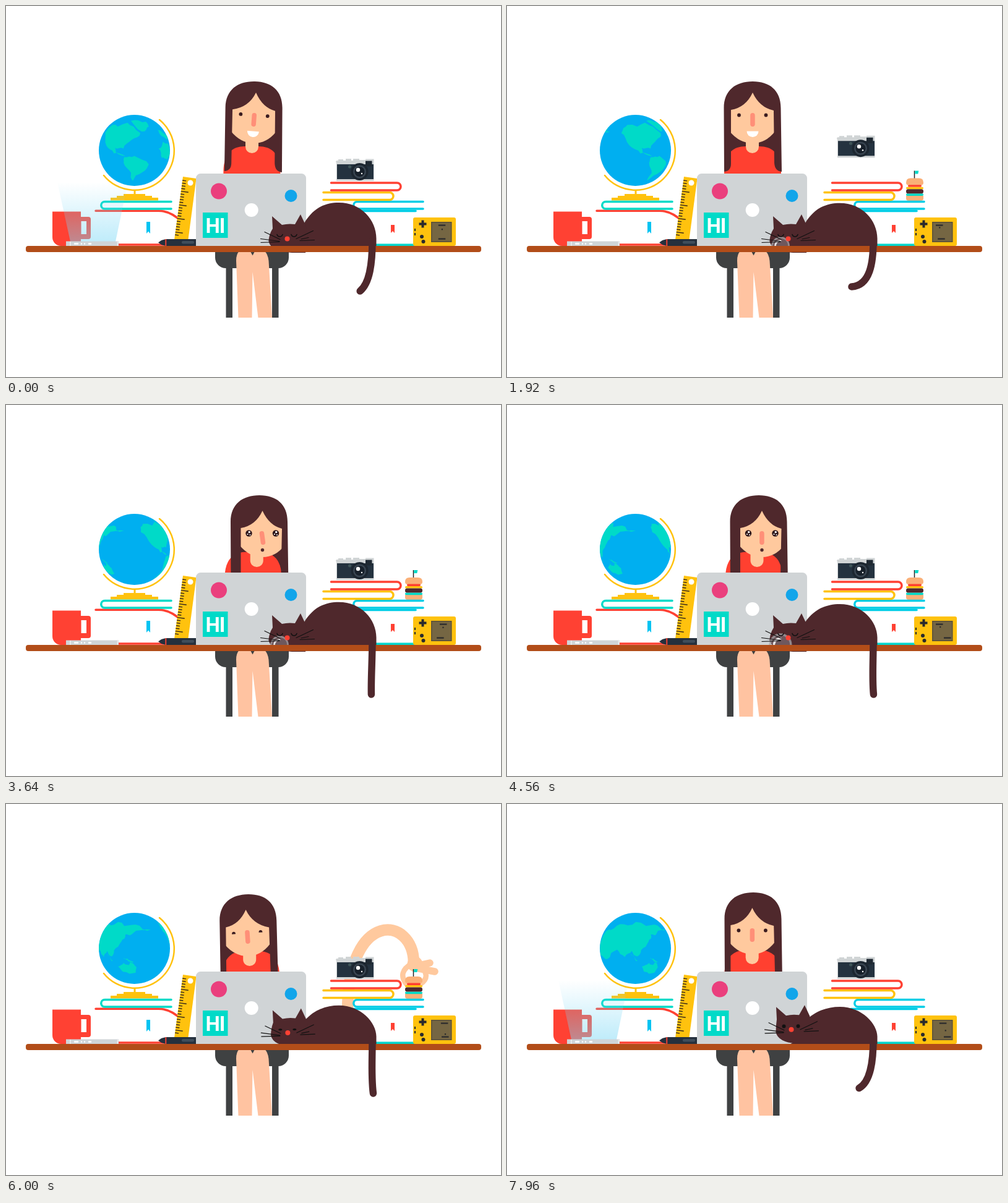
Recreate the animation shown at these times as an HTML page. Size 800 by 600 pixels, loop 8 s.

```html
<!DOCTYPE html>
<html lang="en">
<head>
<meta charset="utf-8">
<title>Desk</title>
<style>
html, body { margin: 0; width: 100%; height: 100%; overflow: hidden; background: #fff; }
svg { display: block; width: 100vw; height: 100vh; }
.line { fill: #fff; stroke-width: 3.5; stroke-linecap: round; }
.skin { fill: #ffc99e; }
.limb { fill: none; stroke: #ffc99e; stroke-linecap: round; }
.hair { fill: #4f282c; }
.ink { fill: none; stroke: #111; stroke-width: 1.2; stroke-linecap: round; }
</style>
</head>
<body>
<svg viewBox="0 0 800 600">
  <defs>
    <clipPath id="ball"><circle cx="207.5" cy="233.5" r="57.5"/></clipPath>
    <linearGradient id="glow" x1="0" y1="0" x2="0" y2="1">
      <stop offset="0" stop-color="#7ad7f5" stop-opacity="0"/>
      <stop offset="1" stop-color="#7ad7f5" stop-opacity=".48"/>
    </linearGradient>
    <g id="sparkle">
      <circle r="5.2" fill="#2d1619"/>
      <g fill="#fff"><circle cx=".7" cy="-2" r="1.7"/><circle cx="-2" cy="1.500" r="1.100"/><circle cx="2" cy="2.500" r="1"/></g>
    </g>
  </defs>

  <!-- chair and legs -->
  <g fill="#3f4142">
    <rect x="355.500" y="415" width="10.500" height="89"/>
    <rect x="430" y="415" width="10.500" height="89"/>
    <rect x="338" y="382" width="119" height="42" rx="17"/>
  </g>
  <path fill="#ffc3a1" d="M378 396Q372 400 372 412L375.500 504H397.500L398.500 430L407.500 504H430L424.500 412Q423 400 417 396Z"/>
  <path fill="#3f4142" d="M395 397h7l-3.500 6.500z"/>

  <!-- globe -->
  <circle cx="207.500" cy="233.500" r="57.500" fill="#00aff0"/>
  <path id="land" clip-path="url(#ball)" fill="#00dac8"/>
  <path d="M248 184A64 64 0 1 1 158 274" fill="none" stroke="#ffc20e" stroke-width="2.500" stroke-linecap="round"/>
  <path fill="#ffc20e" d="M206.500 297h3v7h15.500v3h11v3h10v4.500h-77v-4.500h10v-3h11v-3h16.500z"/>

  <!-- left books -->
  <path class="line" stroke="#ff4133" d="M182 386H262M145 331.200H246Q266 331 284 349"/>
  <path class="line" stroke="#00dac8" d="M267 316.500H159.500a5.700 5.700 0 0 0 0 11.500H267"/>
  <path fill="#00c3f2" d="M227 349h6v19l-3-3.500l-3 3.500z"/>

  <!-- mug, phone and its beam -->
  <path fill="#ff4133" fill-rule="evenodd" d="M75 332.500H121V341H133a4 4 0 0 1 4 4V373a4 4 0 0 1-4 4H121V388H89a14 14 0 0 1-14-14zM121.500 348V369H130V348z"/>
  <path id="beam" fill="url(#glow)" d="M83 285H197L177 381H104Z"/>
  <rect x="97" y="380.500" width="85" height="7.500" fill="#cfd4d7"/>
  <path d="M104 381v7M180.500 381v7" stroke="#eef1f2" stroke-width="1.500"/>
  <path d="M111 384.500h5M122 384.500h0M127 384.500h0M134 384.500h3" stroke="#fff" stroke-width="2.500" stroke-linecap="round"/>

  <!-- ruler -->
  <path fill="#ffc20e" d="M286 276L307.500 279L294 381L272 378Z"/>
  <circle cx="298" cy="286" r="4.500" fill="#fff"/>
  <path id="ticks" stroke="#33261a" stroke-width="1.400"/>

  <!-- pen -->
  <path fill="#25303d" d="M246 382.500L251 379L258 377H310q3 0 3 2.500h2.500q2 0 2 3t-2 3H313q0 2.500-3 2.500H258L251 386z"/>
  <path d="M258.300 377V388" stroke="#ff4133" stroke-width="1.800"/>
  <rect x="284" y="380" width="20" height="4.500" rx="2" fill="#3f4d5b"/>

  <!-- girl -->
  <path id="mane" class="hair" d="M352 165H442V255H352Z"/>
  <path id="shirt" fill="#ff4030" d="M351 300V268C351 243 362 227 385 227H408C432 227 443 243 443 268V300Z"/>
  <path id="neck" class="skin" d="M386 200H407V227.500a10.500 10.500 0 0 1-21 0z"/>
  <g id="head">
    <path id="face" class="skin" d="M397 136L433 166V203Q418 222 397 222Q376 222 360 203V166Z"/>
    <path id="hair" class="hair"/>
    <g id="features">
      <rect id="nose" x="393.200" y="173" width="7.500" height="22" rx="3.700" fill="#ff8f78"/>
      <path id="smile" fill="#fff" d="M387.500 202.500h19a9.500 9.500 0 0 1-19 0z"/>
      <circle id="oh" cx="397" cy="203.500" r="2.700" class="hair"/>
      <g id="dots" fill="#3b1c20"><circle cx="375" cy="176.500" r="2.900"/><circle cx="418.500" cy="176.500" r="2.900"/></g>
      <path id="lids" fill="#3b1c20" d="M372 178a3 3.600 0 0 1 6 0zM415.500 178a3 3.600 0 0 1 6 0z"/>
      <g id="wide"><use href="#sparkle" x="375" y="176.500"/><use href="#sparkle" x="418.500" y="176.500"/></g>
    </g>
  </g>

  <!-- laptop -->
  <path fill="#d0d4d6" d="M307 388V278.500a7.500 7.500 0 0 1 7.500-7.500H477.500a7.500 7.500 0 0 1 7.500 7.500V388Z"/>
  <circle cx="344" cy="299.500" r="13" fill="#ea3f7d"/>
  <circle cx="460.500" cy="307" r="10" fill="#12a5ea"/>
  <circle cx="396.700" cy="330" r="11" fill="#fff"/>
  <rect x="318" y="334" width="40.500" height="41" fill="#00dac8"/>
  <text x="338" y="366.500" font-family="Roboto, sans-serif" font-weight="700" font-size="33" letter-spacing="-1" text-anchor="middle" fill="#fff">HI</text>

  <!-- arm and burger -->
  <path id="arm" class="limb" stroke-width="18.500"/>
  <g id="hand" class="limb">
    <circle cx="2" cy="-41" r="6" stroke-width="13"/>
    <path stroke-width="11.500" d="M8 -39L26 -43M8 -34L34 -29"/>
    <path stroke-width="8.500" d="M-3 -42Q-27 -28 -12 -9M8 -40Q30 -22 11 -9"/>
  </g>
  <g id="burger">
    <path d="M-.500 -33V-18" stroke="#222" stroke-width="1.500"/>
    <path fill="#00dac8" d="M.300 -33h6l-1 5h-5z"/>
    <g fill="#fab078">
      <path d="M-14 -14q0-7 7-7h14q7 0 7 7q0 4-4 4h-20q-4 0-4-4z"/>
      <path d="M-14 7h28v4q0 4-4 4h-20q-4 0-4-4z"/>
    </g>
    <rect x="-11" y="-10.500" width="22" height="3.500" rx="1.700" fill="#ff4030"/>
    <rect x="-14" y="-7" width="28" height="3.500" rx="1.700" fill="#ffc20e"/>
    <rect x="-14" y="3.500" width="28" height="3.700" rx="1.800" fill="#00dac8"/>
    <rect x="-14" y="-3.500" width="28" height="7" rx="3.300" class="hair"/>
  </g>

  <!-- right books -->
  <rect x="555" y="331" width="107" height="57" fill="#fff"/>
  <path class="line" stroke="#00cde6" d="M556 331.500H662"/>
  <path class="line" stroke="#00d5cc" d="M598 386.300H662"/>
  <path class="line" stroke="#00cde6" d="M674 316.500H567.500a5.700 5.700 0 0 0 0 11.500H674"/>
  <path class="line" stroke="#ffc20e" d="M513 301.500H620a6 6 0 0 1 0 12H513"/>
  <path class="line" stroke="#ff4133" d="M525.500 286H632a6 6 0 0 1 0 12H525.500"/>
  <path fill="#ff4133" d="M622 354h6v13l-3-3l-3 3z"/>

  <!-- camera -->
  <g id="camera">
    <path fill="#d0d4d5" d="M533 252q0-2 2-2h2v-2h8v2h4v-3h9v3h3v-3h10v2h10v-1.500h13.500V283H534V254z"/>
    <path fill="#24323f" d="M535 256H594V280H535z"/>
    <path fill="#1f2932" d="M581 250.500h10.500v9h-10.500z"/>
    <circle cx="555.500" cy="260" r="2.500" fill="#3f5558"/>
    <circle cx="571.500" cy="268" r="14" fill="#1c2630"/>
    <circle cx="571.500" cy="268" r="10.500" fill="#3a4652"/>
    <circle cx="571.500" cy="268" r="8" fill="#17202a"/>
    <circle cx="569" cy="265" r="3.200" fill="#fff"/>
    <circle cx="575" cy="271" r="1.200" fill="#fff"/>
  </g>

  <!-- game console -->
  <rect x="658" y="342" width="69" height="46" rx="3" fill="#ffc20e"/>
  <rect x="687" y="349" width="33.500" height="33" fill="#5a5038"/>
  <rect x="688.500" y="350.500" width="30.500" height="30" fill="#756643"/>
  <g fill="#2a2a2c">
    <path d="M671.500 346.500h4v4h4v4h-4v4h-4v-4h-4v-4h4zM660 360h2v4h-2zM660 367h2v4h-2z"/>
    <circle cx="672" cy="373" r="3"/><circle cx="674.500" cy="381" r="3"/>
    <rect id="padA" y="353.500" width="11.500" height="2.200"/>
    <rect id="padB" y="375.500" width="11.500" height="2.200"/>
    <rect id="dot" width="2.200" height="2.200"/>
  </g>

  <!-- cat -->
  <path id="back" class="hair"/>
  <g id="cat">
    <path id="skull" class="hair"/>
    <g id="bubble" fill="none" stroke-width=".2">
      <path d="M-1 0A1 1 0 0 1 1 0" fill="#cfe6ee" fill-opacity=".25" stroke="#a9a6aa" stroke-opacity=".7"/>
      <path d="M-.620 -.050A.620 .620 0 0 1 0 -.620" stroke="#fff" stroke-opacity=".85" stroke-linecap="round"/>
    </g>
    <path class="ink" d="M418 365.500L443 377.500M411.500 376.500L442 380.500M412 382.500L442 381.500M469 376.500L496.500 363.500M477 377L489 374.500M475 379.500L498.500 378.500"/>
    <circle cx="454.500" cy="376.500" r="4" fill="#ff4133"/>
    <path id="shut" class="ink" style="stroke-width:1.500" d="M438 369.500q1 3.500 4.500 3.500t4.500-3.500M461 369.500q1 3.500 4.500 3.500t4.500-3.500"/>
    <g id="eyes" fill="#111"><ellipse cx="442.500" cy="371.300" rx="3"/><ellipse cx="465.500" cy="371" rx="3"/></g>
  </g>

  <rect x="32" y="388" width="736" height="10" rx="4" fill="#b24d19"/>
  <path id="tail" fill="none" stroke="#4f282c" stroke-width="11.500" stroke-linecap="round"/>
</svg>
<script>
const LOOP = 8000, TAU = 2 * Math.PI, RAD = TAU / 360, SPIN = 22.5;
const el = {};
document.querySelectorAll('[id]').forEach(n => el[n.id] = n);
const set = (id, name, value) => el[id].setAttribute(name, value);
const show = (id, on) => set(id, 'display', on ? 'inline' : 'none');
const clamp = (v, a, b) => Math.max(a, Math.min(b, v));
const mix = (a, b, u) => a + (b - a) * u;
const wave = (t, period, peak = 0) => Math.cos((t - peak) / period * TAU);
function ramp(t, a, b) {
  const u = clamp((t - a) / (b - a), 0, 1);
  return u * u * (3 - 2 * u);
}
let seed = 7;
const random = () => (seed = seed * 16807 % 2147483647) / 2147483647;

// Rough corners of each land as [longitude, latitude]; the coast between them is jagged.
const west = [
  [[-70, 29], [-62, 46], [-18, 51], [11, 29], [-5, 17], [-18, 3], [-33, 4], [-31, -3], [-15, -9], [-35, -5], [-53, 8]],
  [[-10, 56], [33, 54], [33, 42], [14, 32]],
  [[-17, -11], [0, -9], [26, -23], [18, -37], [-5, -59], [-7, -39], [-19, -20]],
  [[43, 3], [56, 14], [75, 10], [85, -5], [71, -15], [52, -12]],
  [[53, 36], [66, 30], [90, 20], [56, 24]]
];
const east = [
  [[-61, 32], [-36, 43], [1, 48], [46, 42], [77, 32], [39, 23], [28, 23], [22, 11], [9, -3], [3, -13], [-6, -4], [-18, -14], [-31, -2], [-54, -17], [-82, -12], [-85, 8]],
  [[-8, -9], [-3, -12], [5, -21], [1, -21]],
  [[25, -16], [32, -17], [43, -23], [33, -21]],
  [[12, -31], [25, -24], [34, -28], [36, -23], [48, -32], [47, -43], [19, -41]]
];
function jag(pts, depth = 2) {
  if (!depth) return pts;
  return jag(pts.flatMap((p, i) => {
    const q = pts[(i + 1) % pts.length], k = (random() - .5) * .35;
    const dx = q[0] - p[0], dy = q[1] - p[1];
    return [p, [p[0] + dx / 2 + dy * k, p[1] + dy / 2 - dx * k]];
  }), depth - 1);
}
const farSide = east.map(land => land.map(([lon, lat]) => [lon - 179, lat]));
const lands = [...west, ...farSide].map(land => jag(land));

function drawLand(t) {
  const spin = SPIN * t / 1000;
  let d = '';
  for (const pts of lands) {
    const mean = pts.reduce((sum, p) => sum + p[0], 0) / pts.length + spin;
    const turn = spin - Math.round(mean / 360) * 360;
    d += 'M' + pts.map(([lon, lat]) => {
      const a = clamp(lon + turn, -90, 90) * RAD, b = lat * RAD;
      return `${207.5 + 57.5 * Math.cos(b) * Math.sin(a)} ${233.5 - 57.5 * Math.sin(b)}`;
    }).join('L') + 'Z';
  }
  set('land', 'd', d);
}

function drawTicks() {
  let d = '';
  for (let i = 0; i < 21; i++) {
    const y = 282 + i * 4.4, w = i % 5 === 4 ? 12 : 6;
    d += `M${286 - (y - 276) * .137} ${y}l${w} ${w * .14}`;
  }
  set('ticks', 'd', d);
}

function drawGirl(t) {
  const greet = 1 - ramp(t, 0, 700), down = ramp(t, 1960, 2440), settle = ramp(t, 3640, 4560);
  const away = ramp(t, 5200, 5900), turn = ramp(t, 6200, 6900), rest = ramp(t, 7100, 7900);
  const x = 2 * greet + 12.5 * down - 2.5 * settle - 14 * away + 9 * turn - 4 * rest;
  const y = 24 * down - 3 * turn;
  const lean = 1.2 * greet - .7 * away + .7 * turn;
  const tilt = 3 * (greet - away + 2 * turn - rest);
  const fx = 5 * down - 6.6 * away, fy = 7 * down;
  const pose = `translate(${x} ${y}) rotate(${lean} 397 265)`;

  set('mane', 'transform', pose);
  set('head', 'transform', pose);
  set('shirt', 'transform', `translate(${x * .2} ${y * .45})`);
  set('neck', 'transform', `translate(${(x + fx) * .5} ${y})`);
  set('face', 'transform', `translate(${fx} 0)`);
  set('features', 'transform', `translate(${fx} ${fy}) rotate(${tilt} 397 185)`);
  set('nose', 'transform', `rotate(${8 * (settle - down)} 397 184)`);

  const l = 362 + fx, r = 431 + fx * .5, m = 397 + fx + tilt * .8;
  set('hair', 'd', `M351 268L350.5 165C350.5 136 370 122 397 122S442.5 136 442.5 165L444 268Q432 267 432 252
    L${r} ${169 + fy}Q${m + 11} ${164 + fy} ${m} ${140 + fy}Q${m - 11} ${164 + fy} ${l} ${168 + fy}V255Q${l} 267 351 268Z`);

  const awed = t > 2200 && t < 5400, sleepy = t >= 5400 && t < 7300;
  show('smile', t < 2200);
  show('oh', awed);
  show('wide', awed);
  show('lids', sleepy);
  show('dots', !awed && !sleepy);
}

// The hand rises behind the camera, reaches over for the burger and sinks with it.
function drawArm(t) {
  const rise = ramp(t, 5100, 5500) - ramp(t, 6980, 7350);
  const reach = ramp(t, 5500, 5900) - ramp(t, 6150, 6700);
  const x = 592 + 67 * reach, y = 207 + 93 * reach + 145 * (1 - rise), angle = -138 * (1 - reach);
  const s = Math.sin(angle * RAD), c = Math.cos(angle * RAD);
  const wx = x + 42 * s, wy = y - 42 * c, k = 28 + 50 * reach;
  const hold = `translate(${x} ${y}) rotate(${angle})`;
  show('arm', rise > 0);
  show('hand', rise > 0);
  set('arm', 'd', `M552 335C552 ${300 - 130 * reach} ${wx + k * s} ${wy - k * c} ${wx} ${wy}`);
  set('hand', 'transform', hold);

  const q = Math.max(0, t - 1600) / 1000;
  const pop = 1 - Math.exp(-9 * q) * Math.cos(14 * q);
  show('burger', t > 1600 && t < 7350);
  set('burger', 'transform', t > 6000 ? hold
    : `translate(659 315) scale(${Math.min(1, pop)} ${pop}) translate(0 -15)`);

  const hop = (t - 1600) / 447;
  set('camera', 'transform', `translate(0 ${-78 * Math.max(0, 1 - hop * hop)})`);
}

function drawCat(t) {
  const wake = .55 * ramp(t, 5400, 5900) + .45 * ramp(t, 6200, 6680);
  const breath = wave(t, 1720);
  const p = 320.5 - 2.5 * breath * (1 - wake) + 7.5 * wake;
  set('back', 'd', `M456 389Q470 384 472 366L482 351C497 ${p + 8} 516 ${p} 538 ${p}C574 ${p} 598.5 ${p + 28} 598.5 376V389Z`);

  const cheek = 424.5 + 5 * wake;
  set('cat', 'transform', `translate(${5 * wake ** 3} ${-11.7 * wake})`);
  set('skull', 'd', `M430 340L446 354Q456 351.5 467 353L476 337L484 354Q492 376 484 399H462Q${cheek + 4} 397 ${cheek} 381Q${cheek} 370 431 360Z`);
  show('shut', wake < .1);
  show('eyes', wake >= .1);
  for (const eye of el.eyes.children) eye.setAttribute('ry', 3 * wake);

  const size = (15.5 - 2.5 * breath) * (ramp(t, 900, 1700) - ramp(t, 5300, 5400));
  show('bubble', size > 0);
  set('bubble', 'transform', `translate(442 388) scale(${size})`);

  const u = t < 5700 ? .5 + .5 * wave(t, 1080, 300) : 1 - .67 * ramp(t, 6050, 6720);
  set('tail', 'd', `M592 379C592 415 ${587 + 3 * u} ${452 - 10 * u} ${557 + 36.5 * u} ${454 + 14 * Math.min(1, u * 1.2)}`);
}

function drawGame(t) {
  const a = 698 + 5 * wave(t, 2650, 600), b = 701 + 5 * wave(t, 1700, 1150);
  const fall = Math.abs((t - 1900) / 450 % 2);
  const u = fall > 1 ? 2 - fall : fall;
  set('padA', 'x', a);
  set('padB', 'x', b);
  set('dot', 'x', mix(a, b, u) + 5);
  set('dot', 'y', mix(356.5, 373, u));
}

function draw(t) {
  drawLand(t);
  drawGirl(t);
  drawArm(t);
  drawCat(t);
  drawGame(t);
  set('beam', 'opacity', 1 - ramp(t, 700, 1500) + ramp(t, 6200, 6720));
}

drawTicks();
const start = performance.now();
function frame() {
  draw((performance.now() - start) % LOOP);
  requestAnimationFrame(frame);
}
frame();
</script>
</body>
</html>
```
